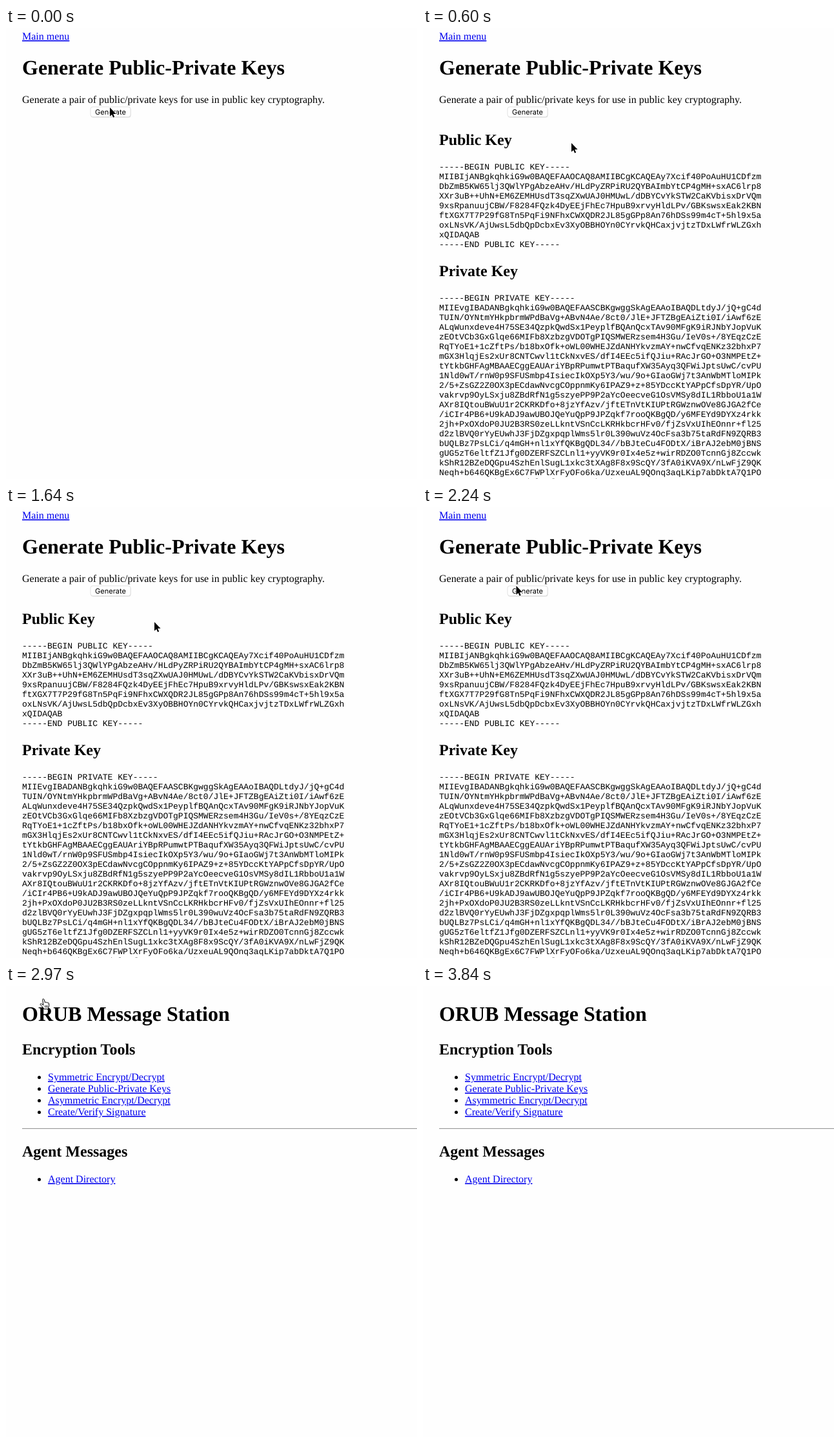
Animation of 637 by 698 pixels, one loop 4290 ms. Source, as an HTML page:

```html
<!DOCTYPE html>
<html lang="en">
<meta charset="utf-8">
<title>Key generator</title>
<style>
  html, body { margin: 0; height: 100%; overflow: hidden; background: #fefefe; }
  svg { display: block; }
  text { font: 16px "Liberation Serif", serif; white-space: pre; text-rendering: geometricPrecision; }
  .h1 { font-size: 32px; font-weight: bold; }
  .h2 { font-size: 24px; font-weight: bold; }
  .link { fill: #00e; text-decoration: underline 1px; text-decoration-skip-ink: none; }
  .key { font: 13px "Liberation Mono", monospace; }
  .button { font: 11px Inter, sans-serif; text-anchor: middle; }
</style>
<svg id="stage" width="637" height="698" viewBox="0 0 637 698">
  <g id="generator">
    <rect x="131.5" y="123" width="62" height="15.5" rx="3.5" fill="#d4d4d4"/>
    <rect x="131" y="122" width="62" height="15.5" rx="3.5" fill="#fff" stroke="#e2e2e2"/>
    <g id="keys"></g>
  </g>
  <g id="menu">
    <path d="M25 220.5H637" stroke="#9a9a9a"/>
    <path d="M25 221.5H637" stroke="#eee"/>
  </g>
  <path id="arrow" d="M0 0V13.8L3.1 10.9 5.1 15.6 7.2 14.7 5.2 10.1H9.6Z"
    stroke="#fff" stroke-width="1.6" paint-order="stroke"/>
  <g id="hand" stroke="#000" stroke-linejoin="round" stroke-linecap="round">
    <path fill="#fff" d="M4.6 2.4C4.2.7 6.5.3 7 1.9L8.4 6.6C8.8 5.6 10.4 5.7 10.6 6.8 11 6 12.4 6.2 12.6 7.2 13.2 6.6 14.3 7 14.4 8L14.8 11.5 13.6 14.5V16.7H6.8L6 15 3 11.8 1.2 9.6C.8 8.4 2.2 7.9 3.2 8.7L5.6 10.4Z"/>
    <path fill="none" stroke-width=".8" d="M8.6 11.3V14.2M10.5 11.3V14.2M12.3 11.3V14.2"/>
  </g>
</svg>
<script>
const LOOP = 4290;
const publicKey = `-----BEGIN PUBLIC KEY-----
MIIBIjANBgkqhkiG9w0BAQEFAAOCAQ8AMIIBCgKCAQEAy7Xcif40PoAuHU1CDfzm
DbZmB5KW65lj3QWlYPgAbzeAHv/HLdPyZRPiRU2QYBAImbYtCP4gMH+sxAC6lrp8
XXr3uB++UhN+EM6ZEMHUsdT3sqZXwUAJ0HMUwL/dDBYCvYkSTW2CaKVbisxDrVQm
9xsRpanuujCBW/F8284FQzk4DyEEjFhEc7HpuB9xrvyHldLPv/GBKswsxEak2KBN
ftXGX7T7P29fG8Tn5PqFi9NFhxCWXQDR2JL85gGPp8An76hDSs99m4cT+5hl9x5a
oxLNsVK/AjUwsL5dbQpDcbxEv3XyOBBHOYn0CYrvkQHCaxjvjtzTDxLWfrWLZGxh
xQIDAQAB
-----END PUBLIC KEY-----`;
const privateKey = `-----BEGIN PRIVATE KEY-----
MIIEvgIBADANBgkqhkiG9w0BAQEFAASCBKgwggSkAgEAAoIBAQDLtdyJ/jQ+gC4d
TUIN/OYNtmYHkpbrmWPdBaVg+ABvN4Ae/8ct0/JlE+JFTZBgEAiZti0I/iAwf6zE
ALqWunxdeve4H75SE34QzpkQwdSx1PeyplfBQAnQcxTAv90MFgK9iRJNbYJopVuK
zEOtVCb3GxGlqe66MIFb8XzbzgVDOTgPIQSMWERzsem4H3Gu/IeV0s+/8YEqzCzE
RqTYoE1+1cZftPs/b18bxOfk+oWL00WHEJZdANHYkvzmAY+nwCfvqENKz32bhxP7
mGX3HlqjEs2xUr8CNTCwvl1tCkNxvES/dfI4EEc5ifQJiu+RAcJrGO+O3NMPEtZ+
tYtkbGHFAgMBAAECggEAUAriYBpRPumwtPTBaqufXW35Ayq3QFWiJptsUwC/cvPU
1Nld0wT/rnW0p9SFUSmbp4IsiecIkOXp5Y3/wu/9o+GIaoGWj7t3AnWbMTloMIPk
2/5+ZsGZ2Z0OX3pECdawNvcgCOppnmKy6IPAZ9+z+85YDccKtYAPpCfsDpYR/UpO
vakrvp9OyLSxju8ZBdRfN1g5szyePP9P2aYcOeecveG1OsVMSy8dIL1RbboU1a1W
AXr8IQtouBWuU1r2CKRKDfo+8jzYfAzv/jftETnVtKIUPtRGWznwOVe8GJGA2fCe
/iCIr4PB6+U9kADJ9awUBOJQeYuQpP9JPZqkf7rooQKBgQD/y6MFEYd9DYXz4rkk
2jh+PxOXdoP0JU2B3RS0zeLLkntVSnCcLKRHkbcrHFv0/fjZsVxUIhEOnnr+fl25
d2zlBVQ0rYyEUwhJ3FjDZgxpqplWms5lr0L390wuVz4OcFsa3b75taRdFN9ZQRB3
bUQLBz7PsLCi/q4mGH+nl1xYfQKBgQDL34//bBJteCu4FODtX/iBrAJ2ebM0jBNS
gUG5zT6eltfZ1Jfg0DZERFSZCLnl1+yyVK9r0Ix4e5z+wirRDZO0TcnnGj8Zccwk
kShR12BZeDQGpu4SzhEnlSugL1xkc3tXAg8F8x9ScQY/3fA0iKVA9X/nLwFjZ9QK
Neqh+b646QKBgEx6C7FWPlXrFyOFo6ka/UzxeuAL9QOnq3aqLKip7abDktA7Q1PO
HQewzzy6a9vhmucrGdmlncfrJga0+cabqBkI8NYXFS3yzUWX9YnmFsv4z4OPISpR
rgoJC+PG/ay/dt2fcpuh7RRPSz+aLlwmdPN/JQ5fW1BAKL0HEhN/M4LZAoGBAKul
MO5ihe1GlMBqS6lu+KHsOTKYagmeuZHoI3cUV11cNKVAeRKdGmNFiFhD4Yei0LSf
2gWS0wGJSXev8C6MGMRgDdIV5fQ9PBu5XtHw3DzXmC3Vk3Gfrw+9Zrp5xXcJR1nM
8OsYc1GMuS9CYz9HoKJdT29LwwZ3Xy2tkTsIMswpAoGBANuuR/COexyV2Y3Pll9b
Y1iUrB4JctiUpTQkQfJwtrfdm/e4Us2yM3os35uUbz8D323/9lUwDwMSqkMUUgvD
bTwZwr64m+OenSTZfHihGEOnnOlQlUNJO2ah2V0j+7/kkw2LaFOxC2m8lgXshD3k`;

const byId = id => document.getElementById(id);
const [generator, keys, menu, arrow, hand] =
  ['generator', 'keys', 'menu', 'arrow', 'hand'].map(byId);

function add(parent, tag, attrs, content = '') {
  const node = document.createElementNS('http://www.w3.org/2000/svg', tag);
  for (const name in attrs) node.setAttribute(name, attrs[name]);
  node.textContent = content;
  parent.append(node);
}
const write = (parent, x, y, content, style = '') =>
  add(parent, 'text', { x, y, class: style }, content);
const writeKey = (y, key) =>
  key.split('\n').forEach((line, i) => write(keys, 25, y + 15 * i, line, 'key'));
function listItem(y, label) {
  add(menu, 'circle', { cx: 51.5, cy: y - 4.5, r: 2.5 });
  write(menu, 65, y, label, 'link');
}

write(generator, 25, 18, 'Main menu', 'link');
write(generator, 25, 72.4, 'Generate Public-Private Keys', 'h1');
write(generator, 25, 116, 'Generate a pair of public/private keys for use in public key cryptography.');
write(generator, 162, 134, 'Generate', 'button');
write(keys, 25, 181, 'Public Key', 'h2');
writeKey(219, publicKey);
write(keys, 25, 384, 'Private Key', 'h2');
writeKey(422, privateKey);

write(menu, 25, 54.4, 'ORUB Message Station', 'h1');
write(menu, 25, 106, 'Encryption Tools', 'h2');
['Symmetric Encrypt/Decrypt', 'Generate Public-Private Keys',
  'Asymmetric Encrypt/Decrypt', 'Create/Verify Signature'
].forEach((label, i) => listItem(146 + 18 * i, label));
write(menu, 25, 264, 'Agent Messages', 'h2');
listItem(304, 'Agent Directory');

// Pointer stops: start time, x, y, shape
const stops = [
  [0, 161, 123, arrow], [450, 182.5, 138, arrow], [600, 230, 178, arrow],
  [2240, 144.5, 122, arrow], [2390, 63.5, 45, arrow], [2530, 56.5, 31, arrow],
  [2680, 52, 22, hand], [2820, 52, 19, hand], [3110, 241.5, 130, arrow],
  [3260, 471.5, 305, arrow], [3400, 559.5, 451, arrow], [3550, 595.5, 584, arrow],
  [3700, 616.5, 650, arrow], [3840, 0, 0, null]
];
const show = (node, visible) => node.setAttribute('display', visible ? 'inline' : 'none');
const move = (node, x, y) => node.setAttribute('transform', `translate(${x} ${y})`);

function draw(now) {
  const t = now % LOOP;
  show(generator, t < 2970);
  show(menu, t >= 2970);
  show(keys, t >= 150 && t < 2970);
  move(generator, 0, t >= 750 && t < 1640 ? -94 : 0);

  const [, x, y, shape] = stops.findLast(stop => stop[0] <= t);
  for (const pointer of [arrow, hand]) show(pointer, pointer === shape);
  if (shape) move(shape, x, y);
}

const start = performance.now();
function tick() {
  draw(performance.now() - start);
  requestAnimationFrame(tick);
}
tick();
</script>
</html>
```
